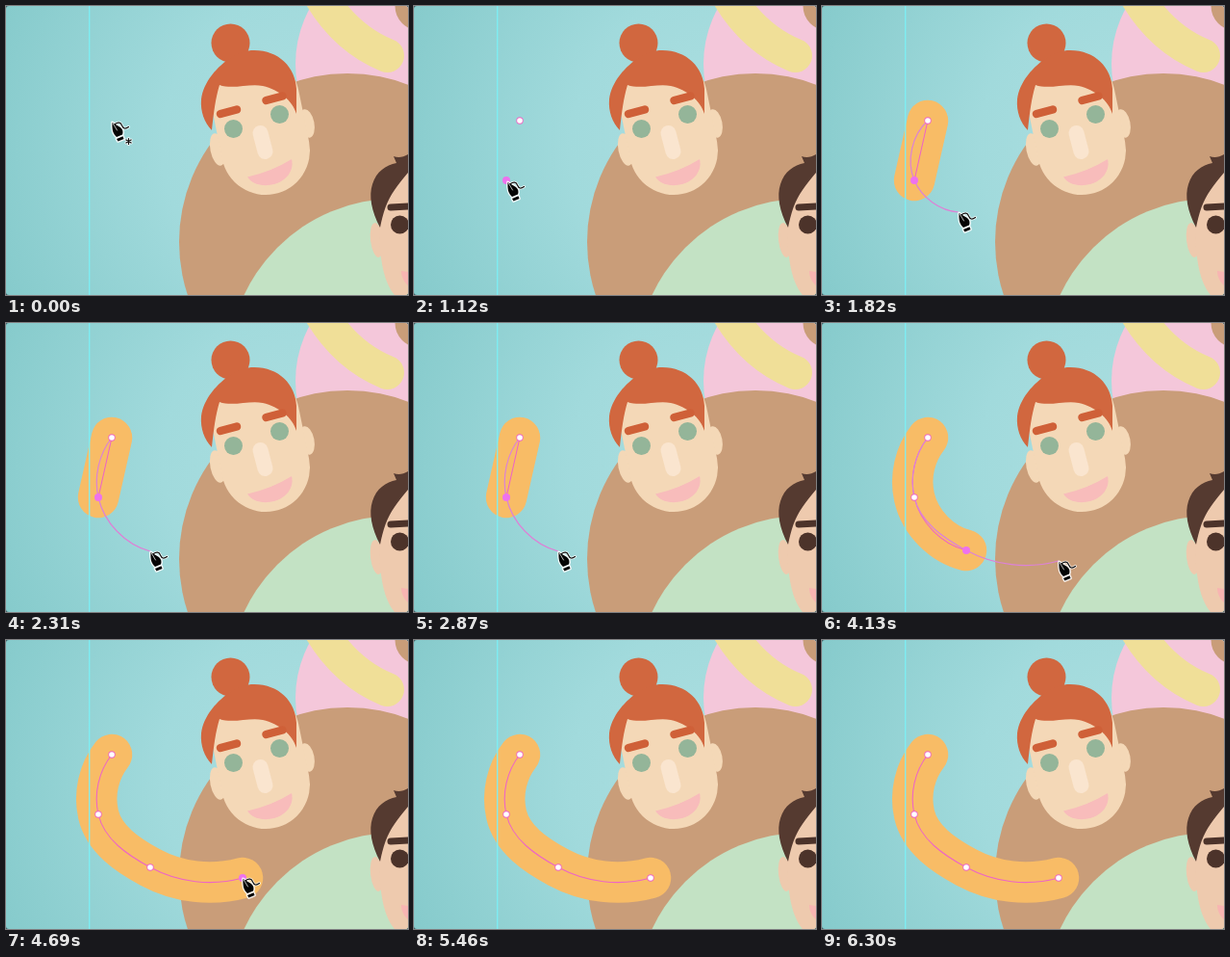
Recreate the animation shown at these times as an HTML page with a canvas. Size 418 by 300 pixels, loop 6370 ms.

```html
<!DOCTYPE html>
<html lang="en">
<head>
<meta charset="utf-8">
<title>Drawing an arm with the curvature pen</title>
<style>
html, body { margin: 0; width: 100%; height: 100%; overflow: hidden; background: #3c5c60; }
canvas { display: block; width: 418px; height: 300px; }
</style>
</head>
<body>
<canvas id="stage" width="418" height="300"></canvas>
<script>
const ctx = document.getElementById('stage').getContext('2d');
const W = 418, H = 300, LOOP = 6370;
const PINK = '#ee66c4';

// Anchor points with the time of each press
const anchors = [
  { x: 110, y: 119, t: 210 },
  { x: 96, y: 181, t: 1060 },
  { x: 150, y: 236, t: 2940 },
  { x: 246, y: 247, t: 4400 }
];
const HOLD = 130;
const DESELECT = 4900;

// Pen positions: time, x, y
const moves = [
  [0, 110, 120], [350, 110, 120], [980, 97, 182], [1260, 97, 182],
  [1820, 142, 214], [2300, 150, 237], [3080, 150, 237], [3500, 262, 239],
  [4100, 246, 247], [4950, 246, 247], [5500, 330, 325]
];

function fill(d, color) {
  ctx.fillStyle = color;
  ctx.fill(new Path2D(d));
}

function line(d, width, color) {
  ctx.strokeStyle = color;
  ctx.lineWidth = width;
  ctx.lineCap = ctx.lineJoin = 'round';
  ctx.stroke(new Path2D(d));
}

function disc(x, y, r, color) {
  ctx.fillStyle = color;
  ctx.beginPath();
  ctx.arc(x, y, r, 0, Math.PI * 2);
  ctx.fill();
}

function oval(x, y, rx, ry, turn, color) {
  ctx.fillStyle = color;
  ctx.beginPath();
  ctx.ellipse(x, y, rx, ry, turn, 0, Math.PI * 2);
  ctx.fill();
}

function drawBackdrop() {
  const sky = ctx.createRadialGradient(330, 145, 60, 330, 145, 370);
  sky.addColorStop(0, '#a9dddf');
  sky.addColorStop(0.35, '#a1dadc');
  sky.addColorStop(1, '#85cacb');
  ctx.fillStyle = sky;
  ctx.fillRect(0, 0, W, H);

  disc(420, 60, 119, '#f4c7da');
  disc(430, 0, 25.5, '#c99d79');
  line('M326 -12 C340 12 361 37 396.5 51.5', 35, '#f0df98');
  disc(355, 245, 175, '#c99d79');
  disc(405, 374, 174, '#c3e2c4');
}

function drawWoman() {
  const skin = '#f4d8b7', hair = '#d1673f';
  oval(220, 149, 7.5, 17, -0.2, skin);
  oval(313, 122, 7.5, 15, -0.2, skin);
  line('M270 150 L259 96', 92, skin);
  disc(233.5, 38.5, 20, hair);
  fill('M214 129 C206 121 202 109 203 97 C205 79 220 62 235 53 ' +
       'C242 48 250 46 258 46 C284 46 301 64 302 86 V112 ' +
       'C298 98 284 87 267 83 C253 80 236 87 222 82 C218 95 216 110 214 129 Z', hair);
  line('M223 112 L240 107.5', 8.5, '#cf6038');
  line('M270.5 98 L287.5 93.5', 8.5, '#cf6038');
  disc(236.5, 127.5, 9.5, '#94b599');
  disc(284.5, 112.5, 9.5, '#94b599');
  line('M264.5 132 L269.5 151', 16, '#fae5cf');
  fill('M251 177.5 Q276 172 297 159 C300 171 291 182 279 185 C267 188 256 185 251 177.5 Z', '#f8bcbb');
}

function drawMan() {
  const skin = '#eecaae', hair = '#553a30';
  oval(385.5, 243, 6.5, 18, -0.12, skin);
  fill('M388 195 L388 235 C389 265 393 287 404 300 H418 V165 Z', skin);
  fill('M389 230 C380 213 377 197 381 185 C385 172 395 165 406 163 L403 156 ' +
       'C408 158 413 157 418 154 V173 C413 179 408 185 404 191 C396 202 392 215 389 230 Z', hair);
  line('M400 209 L418 208', 7, '#4c332a');
  disc(409.5, 227, 9.5, '#4c332a');
  fill('M411 275 L418 276 V290 C414 287 411 281 411 275 Z', '#f8b5b2');
}

// Smooth path whose tangents follow the circle through neighbouring points
function curve(pts) {
  const seg = pts.slice(1).map((p, i) => {
    const dx = p.x - pts[i].x, dy = p.y - pts[i].y;
    return { len: Math.hypot(dx, dy), ang: Math.atan2(dy, dx) };
  });
  const n = seg.length;
  const tan = [];
  for (let i = 1; i < n; i++) {
    const a = seg[i - 1], b = seg[i];
    tan[i] = Math.atan2(
      Math.sin(a.ang) * b.len + Math.sin(b.ang) * a.len,
      Math.cos(a.ang) * b.len + Math.cos(b.ang) * a.len);
  }
  tan[0] = n > 1 ? 2 * seg[0].ang - tan[1] : seg[0].ang;
  tan[n] = n > 1 ? 2 * seg[n - 1].ang - tan[n - 1] : seg[0].ang;

  let d = `M${pts[0].x} ${pts[0].y}`;
  seg.forEach((s, i) => {
    const p = pts[i], q = pts[i + 1], h = s.len * 0.345;
    d += ` C${p.x + h * Math.cos(tan[i])} ${p.y + h * Math.sin(tan[i])}` +
         ` ${q.x - h * Math.cos(tan[i + 1])} ${q.y - h * Math.sin(tan[i + 1])} ${q.x} ${q.y}`;
  });
  return d;
}

function penAt(t) {
  const last = moves[moves.length - 1];
  if (t >= last[0]) return { x: last[1], y: last[2] };
  const i = moves.findIndex(m => m[0] > t);
  const [t0, x0, y0] = moves[i - 1], [t1, x1, y1] = moves[i];
  const u = (t - t0) / (t1 - t0), k = u * u * (3 - 2 * u);
  return { x: x0 + (x1 - x0) * k, y: y0 + (y1 - y0) * k };
}

function drawPen(p, fresh) {
  const nib = 'M0 0 L8.5 5 C11 7 11.5 10 10.5 12.5 L4.5 15 C1 12 -0.5 8 0 0 Z';
  const grip = 'M4.5 17 L11 14.3 L12 17 L6 19.5 Z';
  const swirl = 'M3 1.5 C6 -1 9 0 10 3 C11.5 6.5 13.5 7 17 4.5';
  const star = 'M17 16.5 V22.5 M14.4 18 L19.6 21 M14.4 21 L19.6 18';
  const halo = 'rgba(255,255,255,0.85)';
  ctx.save();
  ctx.translate(p.x + 0.5, p.y + 1);
  [nib, grip, swirl].forEach(d => line(d, 2.8, halo));
  if (fresh) line(star, 3, halo);
  fill(nib, '#050505');
  fill(grip, '#050505');
  line(swirl, 1.2, '#111');
  line('M0.8 1 L5 8', 0.8, '#e8e8e8');
  if (fresh) line(star, 1.2, '#111');
  ctx.restore();
}

function drawArm(t) {
  const placed = anchors.filter(a => t >= a.t);
  const done = anchors.filter(a => t >= a.t + HOLD);
  const pen = penAt(t);
  const active = t < DESELECT;

  if (done.length > 1) line(curve(done), 42.5, '#f8bc66');
  ctx.fillStyle = 'rgba(125,240,245,0.9)';
  ctx.fillRect(86, 0, 1.4, H);
  if (done.length > 1) line(curve(done), 1.1, PINK);

  const end = done[done.length - 1];
  if (end && active && placed.length === done.length &&
      Math.hypot(pen.x - end.x, pen.y - end.y) > 12) {
    line(curve([...done, pen]), 1.2, '#dc82d6');
  }

  placed.forEach((a, i) => {
    if (active && i === placed.length - 1) {
      disc(a.x, a.y, 4, '#ee72ee');
    } else {
      disc(a.x, a.y, 3.7, PINK);
      disc(a.x, a.y, 2.8, '#fff');
    }
  });
  drawPen(pen, placed.length === 0);
}

function render(now) {
  const t = now % LOOP;
  ctx.clearRect(0, 0, W, H);
  ctx.save();
  ctx.beginPath();
  ctx.roundRect(0, 0, W, H, 3);
  ctx.clip();
  drawBackdrop();
  drawWoman();
  drawMan();
  drawArm(t);
  ctx.restore();
}

const start = performance.now();
function tick() {
  render(performance.now() - start);
  requestAnimationFrame(tick);
}
tick();
</script>
</body>
</html>
```
